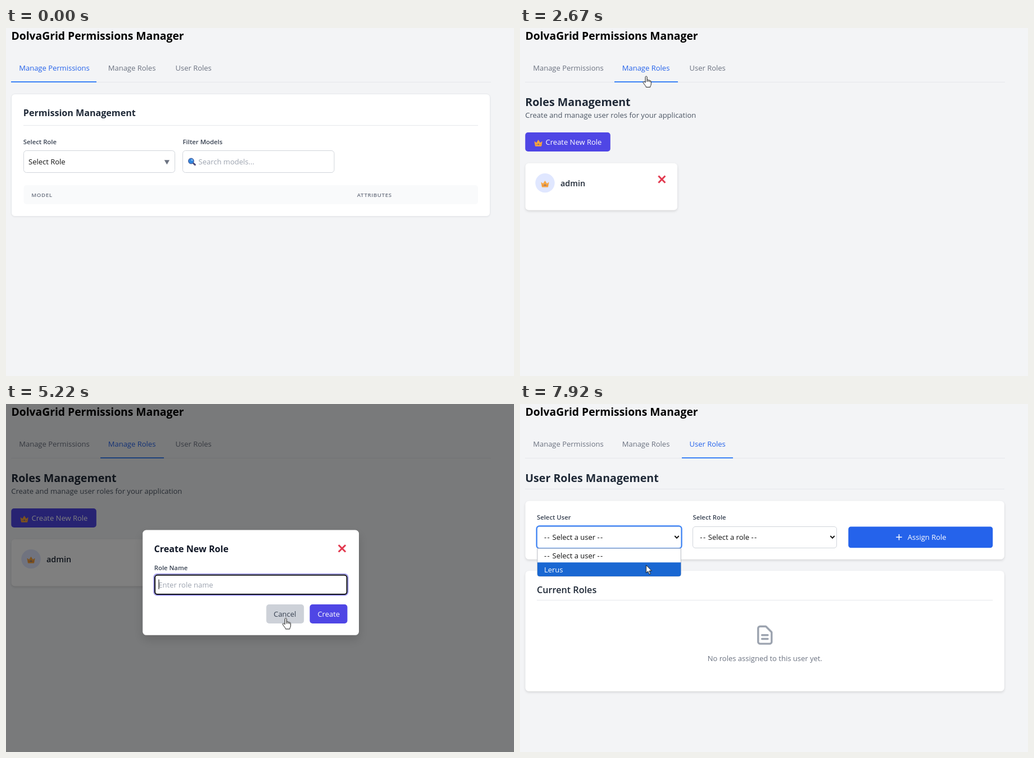
Write an HTML page that moves like this. It is 904 px wide and 620 px high and loops after 7990 ms.

```html
<!DOCTYPE html>
<html lang="en">
<head>
<meta charset="utf-8">
<title>Permissions Manager</title>
<style>
html, body { margin: 0; width: 100%; height: 100%; overflow: hidden; background: #f3f4f6; }
svg { display: block; width: 100%; height: 100%; }
text { font: 400 13px "Open Sans", "Noto Sans", sans-serif; fill: #111; }

/* type */
.h1 { font-size: 19.3px; font-weight: 700; fill: #000; }
.h2 { font-size: 19.6px; font-weight: 700; fill: #1f2937; }
.h3 { font-size: 16.1px; font-weight: 700; fill: #1f2937; }
.h4 { font-size: 16.2px; font-weight: 600; fill: #1f2937; }
.label { font-size: 11.3px; font-weight: 600; fill: #374151; }
.th { font-size: 9.7px; font-weight: 600; letter-spacing: .6px; fill: #6b7280; }
.name { font-size: 14.4px; font-weight: 600; fill: #1f2937; }
.dash { letter-spacing: 1.4px; }
.gray { fill: #6b7280; }
.blue { fill: #2563eb; }
.hint { fill: #9ca3af; }
.white { fill: #fff; }

/* boxes */
.card { fill: #fff; filter: drop-shadow(0 2px 2px rgba(0,0,0,.12)); }
.flat { stroke: #e5e7eb; filter: drop-shadow(0 1px 1px rgba(0,0,0,.05)); }
.field { fill: #fff; stroke: #d1d5db; }
.line { fill: #e5e7eb; }
.mark { fill: #3b82f6; }
.list { fill: #fff; stroke: #b6bac1; }
.pick { fill: #1967d2; }
.main { fill: #4f46e5; }
.cross { fill: none; stroke: #e2394f; stroke-width: 3; }
.cursor path { fill: #fff; stroke: #111; stroke-width: 1; stroke-linejoin: round; }

/* one shared clock */
.on, #cursor, .fade {
  animation-duration: 7.99s;
  animation-iteration-count: infinite;
  animation-timing-function: step-end;
}
#cursor, .fade { animation-timing-function: linear; }

.perm { animation-name: perm; }
.roles { animation-name: roles; }
.users { animation-name: users; }
.role-focus { animation-name: role-focus; }
.role-list { animation-name: role-list; }
.role-first { animation-name: role-first; }
.role-second { animation-name: role-second; }
.modal { animation-name: modal; }
.name-focus { animation-name: name-focus; }
.caret { animation-name: caret; }
.user-focus { animation-name: user-focus; }
.user-list { animation-name: user-list; }
.user-first { animation-name: user-first; }
.arrow { animation-name: arrow; }
.hand { animation-name: hand; }
.beam { animation-name: beam; }
.create { animation-name: create; }
.cancel { animation-name: cancel; }
#cursor { animation-name: travel; }

@keyframes perm { 0% { opacity: 1 } 32.5% { opacity: 0 } }
@keyframes roles { 0% { opacity: 0 } 32.5% { opacity: 1 } 85.9% { opacity: 0 } }
@keyframes users { 0% { opacity: 0 } 85.9% { opacity: 1 } }
@keyframes role-focus { 0% { opacity: 0 } 14.52% { opacity: 1 } }
@keyframes role-list { 0% { opacity: 0 } 15.4% { opacity: 1 } 27.41% { opacity: 0 } }
@keyframes role-first { 0% { opacity: 1 } 20% { opacity: 0 } }
@keyframes role-second { 0% { opacity: 0 } 20% { opacity: 1 } }
@keyframes modal { 0% { opacity: 0 } 50.69% { opacity: 1 } 73.72% { opacity: 0 } }
@keyframes name-focus { 0% { opacity: 0 } 61.08% { opacity: 1 } }
@keyframes caret { 0% { opacity: 0 } 61.08% { opacity: 1 } 67.4% { opacity: 0 } }
@keyframes user-focus { 0% { opacity: 0 } 92.99% { opacity: 1 } }
@keyframes user-list { 0% { opacity: 0 } 93.99% { opacity: 1 } }
@keyframes user-first { 0% { opacity: 1 } 97.1% { opacity: 0 } }
@keyframes arrow {
  0% { opacity: 0 } 3.25% { opacity: 1 } 30.8% { opacity: 0 } 36.6% { opacity: 1 }
  44.6% { opacity: 0 } 50.69% { opacity: 1 } 57.2% { opacity: 0 } 61.9% { opacity: 1 }
  63.5% { opacity: 0 } 73.72% { opacity: 1 } 81.5% { opacity: 0 } 87.9% { opacity: 1 }
}
@keyframes hand {
  0% { opacity: 0 } 30.8% { opacity: 1 } 36.6% { opacity: 0 } 44.6% { opacity: 1 }
  50.69% { opacity: 0 } 63.5% { opacity: 1 } 73.72% { opacity: 0 } 81.5% { opacity: 1 }
  87.9% { opacity: 0 }
}
@keyframes beam { 0% { opacity: 0 } 57.2% { opacity: 1 } 61.9% { opacity: 0 } }
@keyframes create {
  0%, 44.6% { fill: #4f46e5 } 46.43%, 50.6% { fill: #4338ca } 50.7%, 100% { fill: #4f46e5 }
}
@keyframes cancel {
  0%, 63.5% { fill: #e5e7eb } 65.2%, 100% { fill: #cdd1d8 }
}
@keyframes travel {
  0%, 3.25% { transform: translate(434px, 430px) }
  5% { transform: translate(385px, 310px) }
  7.63% { transform: translate(240px, 136px) }
  9.4% { transform: translate(165px, 178px) }
  11.14%, 17% { transform: translate(172px, 230px) }
  20.6%, 26.53% { transform: translate(169.5px, 287.5px) }
  27.41% { transform: translate(174px, 268px) }
  30.6% { transform: translate(222px, 98px) }
  31.8%, 35.92% { transform: translate(224.7px, 86px) }
  37.4% { transform: translate(217px, 108px) }
  42% { transform: translate(134px, 207px) }
  44% { transform: translate(105px, 220px) }
  45.56%, 50.69% { transform: translate(97.2px, 213px) }
  52.4% { transform: translate(140px, 230px) }
  56.8% { transform: translate(385px, 306px) }
  58.45%, 61.2% { transform: translate(420px, 322px) }
  64.4% { transform: translate(495px, 385px) }
  65.33%, 72.84% { transform: translate(498px, 381.5px) }
  73.72% { transform: translate(490px, 364px) }
  74.59% { transform: translate(468.5px, 334px) }
  79.8% { transform: translate(355px, 125px) }
  82%, 87% { transform: translate(334px, 82px) }
  88.3% { transform: translate(325px, 108px) }
  92.5%, 94.6% { transform: translate(244px, 230px) }
  98%, 100% { transform: translate(224.5px, 287px) }
}
</style>
</head>
<body>
<svg viewBox="0 0 904 620">
  <defs>
    <g id="crown">
      <path d="M-6.6-2.4L-3.3 0L0-5.2L3.3 0L6.6-2.4L5.2 5.6H-5.2Z" fill="#f6a540" stroke="#f6a540" stroke-width=".8" stroke-linejoin="round"/>
      <circle cy="2.4" r="1.3" fill="#6a6d92"/>
      <circle cx="-3.3" cy="2.9" r=".8" fill="#d9593d"/>
      <circle cx="3.3" cy="2.9" r=".8" fill="#d9593d"/>
    </g>
    <path id="chevron" d="M-3.7-2L0 1.8L3.7-2" fill="none" stroke="#111" stroke-width="1.9"/>
  </defs>

  <rect width="904" height="620" fill="#f3f4f6"/>
  <text class="h1" x="9.5" y="21">DolvaGrid Permissions Manager</text>
  <rect class="line" x="9" y="96" width="854" height="1"/>

  <g class="on perm">
    <text class="blue" x="23.2" y="76">Manage Permissions</text>
    <text class="gray" x="181.7" y="76">Manage Roles</text>
    <text class="gray" x="301.5" y="76">User Roles</text>
    <rect class="mark" x="9" y="95" width="152" height="2"/>

    <rect class="card flat" x="9.5" y="117.5" width="852" height="218" rx="6.5"/>
    <text class="h3" x="30.8" y="157">Permission Management</text>
    <rect class="line" x="31" y="173" width="809" height="1"/>

    <text class="label" x="30.8" y="207">Select Role</text>
    <rect class="field" x="31.5" y="218.5" width="269" height="39" rx="5"/>
    <g class="on role-focus" fill="none">
      <rect x="29.5" y="217" width="273" height="42.5" rx="7" stroke="#dbe4fb" stroke-width="2.4"/>
      <rect x="32" y="219.5" width="268" height="38" rx="5" stroke="#101114" stroke-width="2"/>
    </g>
    <text x="40" y="243">Select Role</text>
    <path d="M281.7 235.2H291L286.4 243.2Z" fill="#6b7280"/>

    <text class="label" x="314.6" y="207">Filter Models</text>
    <rect class="field" x="314.5" y="218.5" width="269.5" height="39" rx="5"/>
    <path d="M333 240.5L336.4 243.6" stroke="#4c4a78" stroke-width="3" stroke-linecap="round"/>
    <circle cx="329.4" cy="237" r="4.8" fill="#2f86e0" stroke="#4a5f9c" stroke-width="1.2"/>
    <circle cx="331" cy="235.2" r="1.2" fill="#a9d5fb"/>
    <text class="hint" x="342.6" y="243">Search models...</text>

    <rect x="31.5" y="280" width="808.5" height="34" rx="5" fill="#f9fafb"/>
    <text class="th" x="45.2" y="301">MODEL</text>
    <text class="th" x="624.8" y="301">ATTRIBUTES</text>

    <g class="on role-list">
      <path class="list" d="M31.5 258.5H300V304.5Q300 308.7 296 308.7H35.5Q31.5 308.7 31.5 304.5Z"/>
      <text x="40" y="277">Select Role</text>
      <text x="40" y="302">admin</text>
      <g class="on role-first">
        <rect class="pick" x="32" y="259" width="267.6" height="25"/>
        <text class="white" x="40" y="277">Select Role</text>
      </g>
      <g class="on role-second">
        <path class="pick" d="M32 284H300V304.6Q300 308.7 296 308.7H36Q32 308.7 32 304.6Z"/>
        <text class="white" x="40" y="302">admin</text>
      </g>
    </g>
  </g>

  <g class="on roles">
    <text class="gray" x="23.2" y="76">Manage Permissions</text>
    <text class="blue" x="181.7" y="76">Manage Roles</text>
    <text class="gray" x="301.5" y="76">User Roles</text>
    <rect class="mark" x="168" y="95" width="113" height="2"/>

    <text class="h2" x="9.3" y="139">Roles Management</text>
    <text x="9.3" y="160" style="fill:#4b5563">Create and manage user roles for your application</text>

    <rect class="main fade create" x="9.3" y="186" width="151.5" height="34" rx="5"/>
    <use href="#crown" x="32.6" y="204.8"/>
    <text class="white" x="45.6" y="208">Create New Role</text>

    <rect class="card" x="9.6" y="241" width="270.4" height="83.5" rx="6"/>
    <circle cx="44.5" cy="276.1" r="17.2" fill="#e0e7ff"/>
    <use href="#crown" x="44.5" y="277.6"/>
    <text class="name" x="72" y="282">admin</text>
    <path class="cross" d="M246.4 263.5L258.4 275.7M258.4 263.5L246.4 275.7"/>

    <g class="on modal">
      <rect width="904" height="620" fill="#000" opacity=".5"/>
      <rect x="243.2" y="224.5" width="384.8" height="187.3" rx="6.5" fill="#fff" style="filter:drop-shadow(0 8px 9px rgba(0,0,0,.14))"/>
      <text class="h3" x="263.6" y="264" style="fill:#111827">Create New Role</text>
      <path class="cross" d="M591.8 251.3L604.2 263.5M604.2 251.3L591.8 263.5"/>
      <text class="label" x="263.8" y="296">Role Name</text>
      <rect class="field" x="264.5" y="304.5" width="343" height="35" rx="5"/>
      <g class="on name-focus" fill="none">
        <rect x="263" y="302.8" width="345.6" height="38" rx="6" stroke="#8f89f0" stroke-width="1.6"/>
        <rect x="265" y="304.8" width="341.6" height="34.2" rx="4.5" stroke="#101114" stroke-width="2"/>
      </g>
      <text class="hint" x="271.3" y="327">Enter role name</text>
      <rect class="on caret" x="271.5" y="312.5" width="1" height="17.5"/>
      <rect class="fade cancel" x="463.2" y="357" width="67" height="34" rx="5" fill="#e5e7eb"/>
      <text x="476.2" y="379" style="fill:#374151">Cancel</text>
      <rect class="main" x="540.5" y="357" width="67" height="34" rx="5"/>
      <text class="white" x="554.4" y="379">Create</text>
    </g>
  </g>

  <g class="on users">
    <text class="gray" x="23.2" y="76">Manage Permissions</text>
    <text class="gray" x="181.7" y="76">Manage Roles</text>
    <text class="blue" x="301.5" y="76">User Roles</text>
    <rect class="mark" x="288" y="95" width="91" height="2"/>

    <text class="h2" x="9.3" y="139">User Roles Management</text>
    <rect class="line" x="9" y="151" width="853" height="1"/>

    <rect class="card" x="9.5" y="172.8" width="852.3" height="104" rx="6.5"/>
    <text class="label" x="30" y="206">Select User</text>
    <rect class="field" x="30.5" y="218.5" width="256.5" height="38" rx="4.5"/>
    <rect class="on user-focus" x="29.6" y="217.3" width="258" height="40" rx="5" fill="none" stroke="#3b82f6" stroke-width="2.2"/>
    <text x="43" y="242"><tspan class="dash">--</tspan> Select a user <tspan class="dash">--</tspan></text>
    <use href="#chevron" x="279" y="237"/>

    <text class="label" x="307.5" y="206">Select Role</text>
    <rect class="field" x="307.5" y="218.5" width="256" height="38" rx="4.5"/>
    <text x="320.3" y="242"><tspan class="dash">--</tspan> Select a role <tspan class="dash">--</tspan></text>
    <use href="#chevron" x="556" y="237"/>

    <rect x="584.3" y="218.4" width="257" height="37.8" rx="4.5" fill="#2563eb"/>
    <path d="M669.3 237.3H679.7M674.5 232.1V242.5" stroke="#fff" stroke-width="1.5"/>
    <text class="white" x="689.8" y="242">Assign Role</text>

    <rect class="card" x="9.5" y="297.3" width="852.3" height="214.5" rx="6.5"/>
    <text class="h4" x="30" y="337">Current Roles</text>
    <rect class="line" x="30" y="349" width="811.3" height="1"/>
    <g transform="translate(415.2 391.1) scale(1.715)" fill="none" stroke="#9ca3af" stroke-width="2" stroke-linecap="round" stroke-linejoin="round">
      <path d="M9 12H15M9 16H15M17 21H7A2 2 0 0 1 5 19V5A2 2 0 0 1 7 3H12.6A1 1 0 0 1 13.3 3.3L18.7 8.7A1 1 0 0 1 19 9.4V19A2 2 0 0 1 17 21Z"/>
    </g>
    <text class="gray" x="435.8" y="458" text-anchor="middle">No roles assigned to this user yet.</text>

    <g class="on user-list">
      <path class="list" d="M30.8 257.4H286.3V303Q286.3 307 282.3 307H34.8Q30.8 307 30.8 303Z"/>
      <text x="43" y="275"><tspan class="dash">--</tspan> Select a user <tspan class="dash">--</tspan></text>
      <path class="pick" d="M31 282.2H286.3V303Q286.3 307 282.3 307H35Q31 307 31 303Z"/>
      <text class="white" x="43" y="300">Lerus</text>
      <g class="on user-first">
        <path d="M31.3 282.2H285.8V303Q285.8 306.5 282.3 306.5H35Q31.3 306.5 31.3 303Z" fill="#fff"/>
        <text x="43" y="300">Lerus</text>
        <rect class="pick" x="31.3" y="257.9" width="254.5" height="24.3"/>
        <text class="white" x="43" y="275"><tspan class="dash">--</tspan> Select a user <tspan class="dash">--</tspan></text>
      </g>
    </g>
  </g>

  <g id="cursor" class="cursor">
    <path class="on arrow" d="M0 0V14L3.2 11.1L5.6 16.5L7.8 15.5L5.5 10.3H9.8Z"/>
    <g class="on hand">
      <path d="M-1.7 1.7C-1.7-.5 1.4-.5 1.4 1.7V7C2 6 3.9 6.2 4.1 7.4C4.9 6.6 6.4 7 6.6 8.2C7.4 7.7 8.6 8.4 8.6 9.6V13.4C8.6 16 7 17 6.9 19.4H-.3C-.7 17-4.8 13.5-5.7 10.7C-5.7 9-3.4 9-1.7 11.2Z"/>
      <path d="M1.4 7V10M4.1 7.4V10M6.6 8.2V10.4" stroke-width=".8"/>
    </g>
    <path class="on beam" d="M-3-8H-.6L0-7.4L.6-8H3M0-7.4V7.4M-3 8H-.6L0 7.4L.6 8H3" style="fill:none"/>
  </g>
</svg>
</body>
</html>
```
